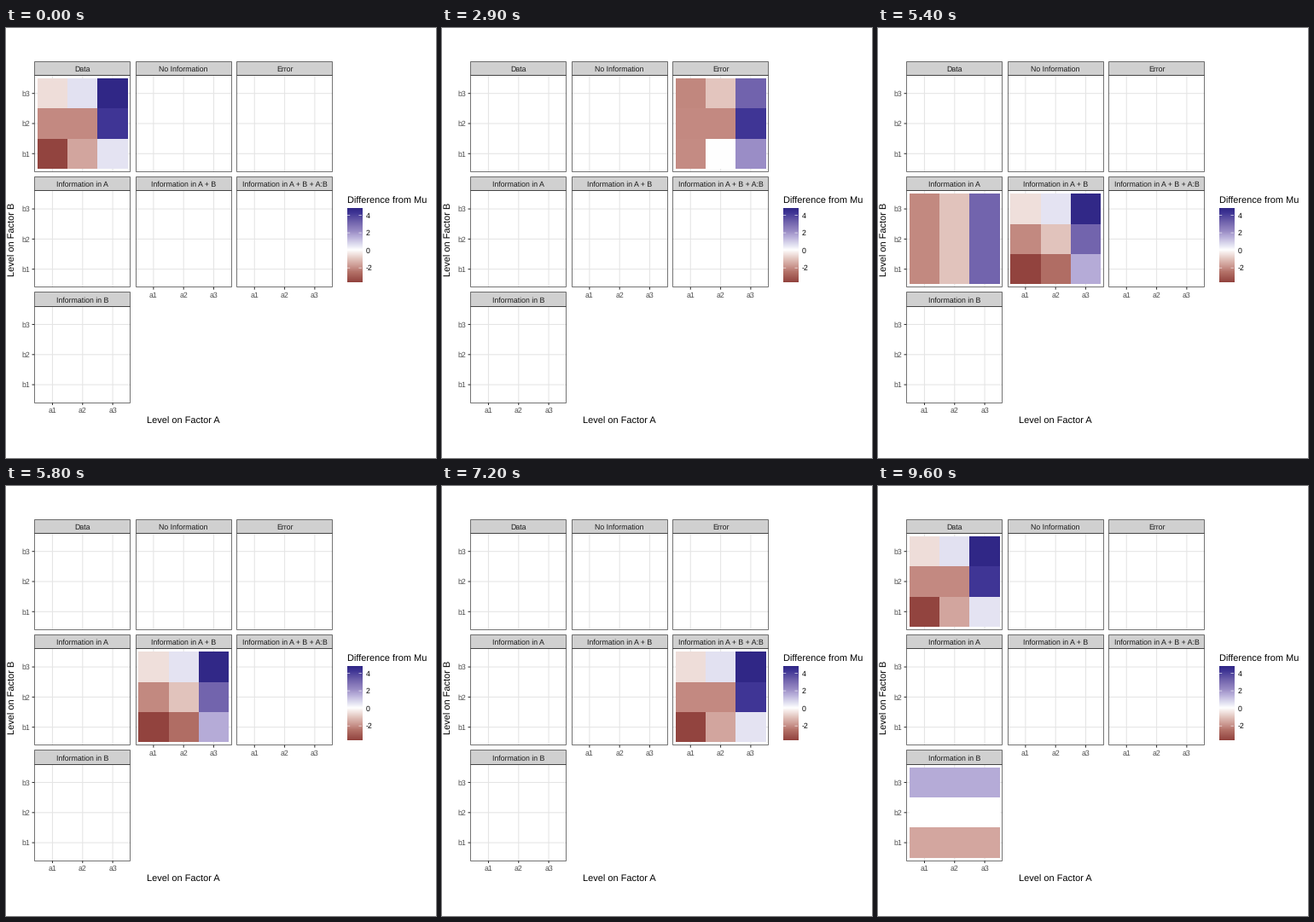
A matplotlib script that plays this animation: 504x504 px, repeating every 10 s.

```python
import numpy as np
import matplotlib.pyplot as plt
from matplotlib.animation import FuncAnimation
from matplotlib.colors import LinearSegmentedColormap, Normalize
from matplotlib.patches import Rectangle

plt.rcParams["font.family"] = "Liberation Sans"
plt.rcParams["text.hinting"] = "none"

SIZE, LOOP, STEP = 504, 10000, 100
CELL = 35.3
PANEL = 3.2 * CELL
LOW, HIGH = -3.67, 4.73

STOPS = [
    (LOW, (146, 67, 62)), (-2.5, (180, 114, 105)), (-2.1, (195, 138, 130)),
    (-1.57, (211, 167, 160)), (-1.03, (226, 196, 189)), (0, (255, 255, 255)),
    (0.55, (226, 225, 241)), (1.57, (180, 170, 215)), (2.07, (155, 142, 198)),
    (3.13, (114, 100, 173)), (4.2, (63, 53, 149)), (HIGH, (48, 39, 134)),
]
NORM = Normalize(LOW, HIGH)
CMAP = LinearSegmentedColormap.from_list(
    "diverging",
    [((v - LOW) / (HIGH - LOW), np.array(rgb) / 255) for v, rgb in STOPS],
    N=512,
)

# Rows are b1, b2, b3; columns are a1, a2, a3.
data = np.array([[-3.65, -1.6, 0.5], [-2.1, -2.1, 4.2], [-0.6, 0.55, 4.7]])
effect_a = np.tile(data.mean(axis=0), (3, 1))
effect_b = np.tile(data.mean(axis=1)[:, None], (1, 3))

# title, row, column, values, time shown, time hidden
PANELS = [
    ("Data", 0, 0, data, 9600, 1400),
    ("No Information", 0, 1, np.zeros((3, 3)), 1000, 2900),
    ("Error", 0, 2, data - effect_b, 2500, 4400),
    ("Information in A", 1, 0, effect_a, 4000, 5800),
    ("Information in A + B", 1, 1, effect_a + effect_b, 5400, 7200),
    ("Information in A + B + A:B", 1, 2, data, 6800, 8600),
    ("Information in B", 2, 0, effect_b, 8200, 10000),
]

fig = plt.figure(figsize=(SIZE / 72, SIZE / 72), dpi=72, facecolor="white")
ax = fig.add_axes([0, 0, 1, 1])
ax.axis("off")


def line(x, y, color, width=1.07, z=1):
    ax.plot(x, y, color=color, lw=width, zorder=z, snap=False,
            solid_capstyle="butt")


def label(x, y, text, size=8.8, color="black", ha="center", **kw):
    ax.text(x, y, text, fontsize=size, color=color, ha=ha,
            va=kw.pop("va", "baseline"), zorder=5, **kw)


def frame(x, y, width, height, fill="none"):
    ax.add_patch(Rectangle((x + 0.5, y + 0.5), width, height, lw=1, fc=fill,
                           ec=(0.2, 0.2, 0.2, 0.68), zorder=3, snap=False))


def draw_panel(title, row, col, values):
    left, top = 33.3 + 118.4 * col, 55.5 + 135.4 * row
    right, bottom = left + PANEL, top + PANEL
    xs = left + CELL * (np.arange(3) + 0.6)
    ys = bottom - CELL * (np.arange(3) + 0.6)

    for x, y in zip(xs, ys):
        line([x, x], [top, bottom], "#e5e5e5")
        line([left, right], [y, y], "#e5e5e5")

    edges = CELL * (np.arange(4) + 0.1)
    tiles = ax.pcolormesh(left + edges, bottom - edges, values, cmap=CMAP,
                          norm=NORM, antialiased=False, zorder=2)

    px, py = round(left), int(top)
    strip = int(top - 16.4)
    frame(px, strip, 112, py - strip, "#d0d0d0")
    frame(px, py, 112, 113)
    label((left + right) / 2, top - 4.8, title, color="#1a1a1a")

    if col == 0:
        for i, y in enumerate(ys, 1):
            line([left - 2.75, left], [y, y], "#333333")
            label(left - 4.95, y + 3.15, f"b{i}", color="#4d4d4d", ha="right")
    if row == 2 or (row == 1 and col > 0):
        for i, x in enumerate(xs, 1):
            line([x, x], [bottom, bottom + 2.75], "#333333")
            label(x, bottom + 11.9, f"a{i}", color="#4d4d4d")
    return tiles


def draw_legend():
    left, right, zero, unit = 399.7, 417, 260.6, 10.27
    ax.imshow(np.linspace(HIGH, LOW, 300)[:, None], cmap=CMAP, norm=NORM,
              extent=(left, right, zero - LOW * unit, zero - HIGH * unit),
              aspect="auto", interpolation="bilinear", zorder=2)
    for value in (4, 2, 0, -2):
        y = zero - value * unit
        line([left, left + 3.5], [y, y], "white", 0.6, 3)
        line([right - 3.5, right], [y, y], "white", 0.6, 3)
        label(422, y + 3.15, str(value), ha="left")
    label(399.5, 206, "Difference from Mu", 11, ha="left")


tiles = [draw_panel(*panel[:4]) for panel in PANELS]
draw_legend()
label(208.2, 464, "Level on Factor A", 11)
label(13.6, 247.5, "Level on Factor B", 11, ha="right", va="center", rotation=90)
ax.set_xlim(0, SIZE)
ax.set_ylim(SIZE, 0)


def update(index):
    t = index * STEP % LOOP
    for mesh, (*_, start, end) in zip(tiles, PANELS):
        mesh.set_visible((t - start) % LOOP < (end - start) % LOOP)
    return tiles


anim = FuncAnimation(fig, update, frames=LOOP // STEP, interval=STEP,
                     repeat=True, repeat_delay=0)
plt.show()
```
